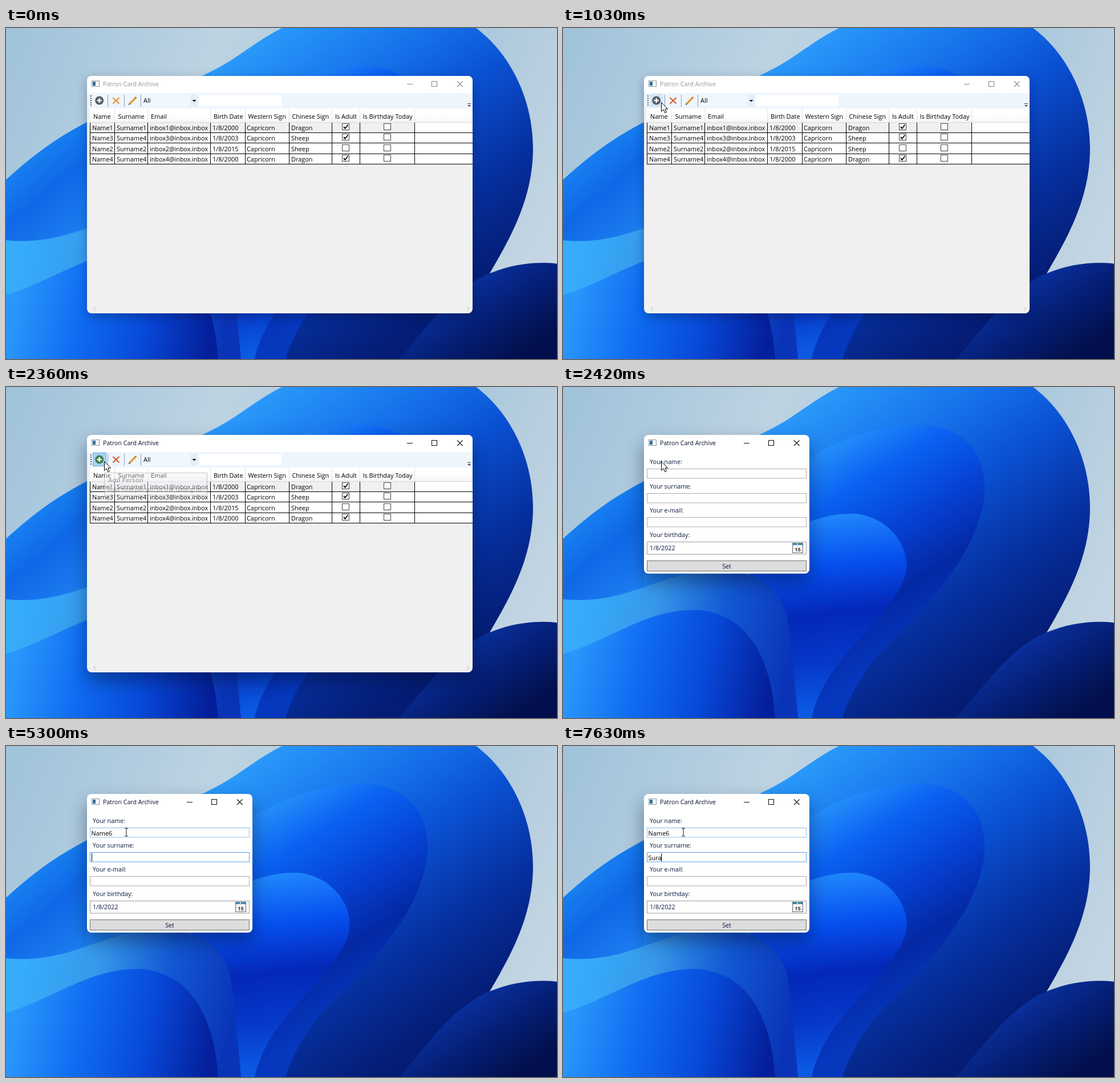
Write an HTML page that moves like this. It is 966 by 580 pixels and loops after 8000 ms.

```html
<!DOCTYPE html>
<html lang="en">
<head>
<meta charset="utf-8">
<title>Patron Card Archive</title>
<style>
html, body { margin: 0; width: 100%; height: 100%; overflow: hidden; }
svg { display: block; width: 966px; height: 580px; }
text { font: 10.9px "Open Sans", "Noto Sans", sans-serif; fill: #000; white-space: pre; }
.title { font-size: 10.6px; font-weight: 500; }
.label { font-size: 10.7px; fill: #06163c; }
.mail { font-size: 10.75px; }
.tip { fill: #575757; }
.bold { font-weight: 700; }
.crisp { shape-rendering: crispEdges; }
.calm { filter: drop-shadow(0 6px 9px rgba(0, 10, 40, .3)); }
.lively { filter: drop-shadow(0 15px 16px rgba(0, 10, 40, .42)); }
</style>
</head>
<body>
<svg id="stage" viewBox="0 0 966 580" xmlns="http://www.w3.org/2000/svg">
  <defs id="defs">
    <clipPath id="gridClip"><rect x="142" y="84" width="676" height="416" rx="8"/></clipPath>
  </defs>
  <g id="wall"></g>

  <g id="listWin">
    <rect id="listFrame" x="142" y="84" width="676" height="416" rx="8" fill="#f0f0f0"/>
    <g clip-path="url(#gridClip)">
      <rect x="142" y="84" width="676" height="30" fill="#fff"/>
      <rect x="142" y="114" width="676" height="27" fill="#eef5fd"/>
      <g id="listTitle"></g>
      <rect id="addBack" x="152.5" y="115.500" width="23" height="23" fill="none"/>
      <rect id="delBack" x="181.500" y="115.500" width="23" height="23" fill="#d3e6f7" stroke="#b5d5f0"/>
      <path d="M149 118V137" stroke="#555" stroke-width="2" stroke-dasharray="2 2"/>
      <path d="M178.500 117V138M207.500 117V138M236.500 117V138" stroke="#8d9bb0"/>
      <circle id="addDot" cx="163.700" cy="127" r="7.500"/>
      <path d="M163.700 123V131M159.700 127H167.700" stroke="#fff" stroke-width="2.400"/>
      <path id="delMark" d="M187.500 122L198.500 132.500M198.500 122L187.500 132.500" stroke-width="2.200"/>
      <path d="M217 132.500L227 122.500" stroke="#e39a30" stroke-width="3.400"/>
      <path d="M214.500 135L216 131.500L218.200 133.700Z" fill="#4b4b4b"/>
      <path d="M226.500 121L228.500 123" stroke="#b9722a" stroke-width="2.400"/>
      <rect x="238" y="117" width="98" height="20" fill="#f1f7fe"/>
      <rect x="323" y="117" width="13" height="20" fill="#e4eefa"/>
      <text x="241" y="131">All</text>
      <path d="M326.500 126H333.500L330 129.500Z" fill="#111"/>
      <rect x="338" y="117" width="145" height="20" fill="#fff"/>
      <path d="M809 132.500H815" stroke="#444"/>
      <path d="M809 135H815L812 138Z" fill="#444"/>
      <g id="grid"></g>
      <path d="M158 488.500L154 492L158 495.500M808 488.500L812 492L808 495.500" fill="none" stroke="#bdbdbd"/>
    </g>
    <g id="tip">
      <rect x="172.500" y="150.500" width="180" height="39" fill="#f1f2f7" stroke="#767676"/>
      <text class="tip bold" x="179" y="167">Add Person</text>
      <text class="tip" x="179" y="182.500">Add new person to the data grid.</text>
    </g>
  </g>

  <g id="formWin">
    <rect class="lively" x="142" y="84" width="290" height="243" rx="8" fill="#fff"/>
    <g id="formTitle"></g>
    <g id="form"></g>
    <path id="caret" class="crisp" stroke="#000" stroke-width="1"/>
  </g>

  <path id="arrow" d="M.5.500V16.300L4.200 12.900L6.700 18.700L9.300 17.600L6.900 12H11.700Z" fill="#fff" stroke="#000"/>
  <path id="beam" d="M-3-7H-1L0-6L1-7H3M0-6V6M-3 7H-1L0 6L1 7H3" fill="none" stroke="#111"/>
</svg>
<script>
const NS = 'http://www.w3.org/2000/svg';
const LOOP = 8000;
const $ = id => document.getElementById(id);

function add(parent, tag, attrs, content) {
  const el = document.createElementNS(NS, tag);
  for (const k in attrs) el.setAttribute(k, attrs[k]);
  if (content) el.textContent = content;
  parent.appendChild(el);
  return el;
}
const label = (parent, x, y, str, cls = '') => add(parent, 'text', { x, y, class: cls }, str);
const rect = (parent, x, y, width, height, fill, stroke = 'none') =>
  add(parent, 'rect', { x, y, width, height, fill, stroke });

// Backdrop: a pale sky and a few broad blue shapes in soft gradients
function gradient(id, x1, y1, x2, y2, colors) {
  const g = add($('defs'), 'linearGradient', { id, x1, y1, x2, y2, gradientUnits: 'userSpaceOnUse' });
  colors.split(' ').forEach((c, i, all) =>
    add(g, 'stop', { offset: i / (all.length - 1), 'stop-color': c }));
}
const shape = (fill, d) => add($('wall'), 'path', { d, fill: `url(#${fill})` });

function buildWall() {
  gradient('sky', 0, 0, 966, 430, '#9fc2da #bdd3e2 #a5c5db #c8d8e4');
  gradient('body', 420, 20, 760, 500, '#2c9cfb #1878ee #0a50d2 #06309f #041c74');
  gradient('arch', 470, 80, 680, 420, '#2a98fb #0a62f2 #0642d4 #0428a4 #0638be');
  gradient('core', 480, 225, 520, 560, '#1f86fb #0650f0 #0428b8 #0638c8 #0c5ae4');
  gradient('side', 20, 220, 130, 350, '#1a86f4 #0f68e6 #1c7cf0');
  gradient('cyan', 30, 390, 400, 470, '#36acfb #3798ea #1258d4 #0a34b8');
  gradient('wave', 20, 470, 360, 540, '#2a96fb #0f6cf2 #0848d8 #041f9a');
  gradient('night', 790, 430, 890, 580, '#0a36ac #052078 #030f4c');

  rect($('wall'), 0, 0, 966, 580, 'url(#sky)');
  shape('body', 'M0 266C48 222 90 192 142 165C230 122 320 105 400 53C430 33 455 14 484 0H824C888 48 924 130 924 210C924 295 888 362 848 430L760 580H0Z');
  shape('arch', 'M380 165C460 92 560 62 640 67C710 74 746 125 738 195C726 285 650 375 575 445C530 490 502 540 490 580H380Z');
  shape('core', 'M330 300C390 248 450 220 512 222C580 229 612 290 600 330C580 395 505 445 465 510C448 540 440 560 436 580H300Z');
  shape('side', 'M0 266C48 222 90 192 142 165V400H0Z');
  shape('cyan', 'M0 372C110 382 155 332 250 323C335 317 388 350 396 420C402 480 408 530 412 580H0Z');
  shape('wave', 'M0 468C90 440 150 387 240 391C325 400 365 475 372 580H0Z');
  shape('night', 'M690 580C740 520 790 452 848 430C890 413 930 409 966 413V580Z');
}

function titleBar(parent, right) {
  add(parent, 'rect', { x: 150.5, y: 92.5, width: 13, height: 10, fill: '#f5f8fa', stroke: '#8b969e' });
  rect(parent, 152, 94, 5, 7, '#2f7199');
  const name = label(parent, 170, 102.3, 'Patron Card Archive', 'title');
  const marks = add(parent, 'path', {
    d: `M${right - 115} 98.500h10M${right - 71.5} 93.500h9v9h-9zM${right - 27} 93.500l9.500 9.500m0-9.500l-9.500 9.500`,
    fill: 'none', 'stroke-width': 1.1
  });
  return active => {
    name.style.fill = active ? '#06102c' : '#929b90';
    marks.setAttribute('stroke', active ? '#111' : '#888');
  };
}

function buildGrid() {
  const g = $('grid');
  const cols = [147, 190, 248, 358, 419, 496, 571, 620, 716];
  const heads = ['Name', 'Surname', 'Email', 'Birth Date', 'Western Sign', 'Chinese Sign', 'Is Adult', 'Is Birthday Today'];
  const headX = [153, 196.5, 254, 364, 424.5, 501.5, 577, 625.5];
  const cellX = [151, 194, 252, 362, 422, 500];
  const rows = [
    [1, 1, '2000', 'Dragon', true], [3, 4, '2003', 'Sheep', true],
    [2, 2, '2015', 'Sheep', false], [4, 4, '2000', 'Dragon', true]
  ];
  gradient('head', 0, 141, 0, 165, '#ffffff #ffffff #f4f5f7');
  rect(g, 147, 141, 671, 24, 'url(#head)');
  rect(g, 147, 165, 671, 74, '#fff');
  rect(g, 147, 165, 569, 18, '#f0f0f0');
  heads.forEach((h, i) => label(g, headX[i], 158.5, h));

  const box = (x, y, on) => {
    rect(g, x + .5, y + .5, 12, 11, '#fff', '#444');
    if (on) add(g, 'path', { d: `M${x + 3} ${y + 6}l2.500 3l5-6.500`, fill: 'none', stroke: '#14182c', 'stroke-width': 2 });
  };
  rows.forEach(([n, s, year, sign, adult], i) => {
    const y = 178.7 + i * 18.4;
    ['Name' + n, 'Surname' + s, `inbox${n}@inbox.inbox`, '1/8/' + year, 'Capricorn', sign]
      .forEach((str, c) => label(g, cellX[c], y, str, c === 2 ? 'mail' : ''));
    const top = Math.round(167 + i * 18.4);
    box(589, top, adult);
    box(662, top, false);
    rect(g, 147, [183, 201, 220, 238][i], 671, 1, '#000');
  });
  cols.forEach((x, i) => {
    if (i) rect(g, x, 142, 1, 23, '#dfe2e6');
    rect(g, x, 165, 1, 74, '#000');
  });
  rect(g, 147, 165, 671, 1, '#d5d8dc');
}

const field = {};
function buildForm() {
  const g = $('form');
  [['name', 'Your name:', 143], ['surname', 'Your surname:', 186], ['mail', 'Your e-mail:', 228]].forEach(([key, str, y]) => {
    label(g, 152, y - 7.7, str, 'label');
    const box = rect(g, 147.5, y + .5, 279, 16.5, '#fff', '#abadb3');
    field[key] = { box, text: label(g, 149.5, y + 13.5, ''), y };
  });
  label(g, 152, 262.6, 'Your birthday:', 'label');
  rect(g, 147.5, 271.5, 279, 21.5, '#fff', '#969ca4');
  label(g, 152, 286, '1/8/2022', 'label');
  rect(g, 402.5, 273.5, 18, 17, '#f4f4f4', '#66696c');
  rect(g, 403, 274, 17, 3, '#3b8cab');
  rect(g, 410, 274, 2, 2, '#fff');
  const day = label(g, 411.5, 287.7, '15', 'bold');
  day.style.fontSize = '9px';
  day.style.fill = '#333';
  day.setAttribute('text-anchor', 'middle');
  rect(g, 147.5, 304.5, 279, 18, '#dddddd', '#707070');
  label(g, 287, 318, 'Set', 'label').setAttribute('text-anchor', 'middle');
}

// Latest value of a [time, value] table
const at = (steps, t) => steps.reduce((v, s) => t >= s[0] ? s[1] : v, steps[0][1]);

const tipShow = [[0, 0], [1430, .5], [1500, 1], [2290, .7], [2360, .4]];
const nameText = [[0, ''], [3620, 'N'], [3760, 'Na'], [3900, 'Nam'], [4100, 'Name'], [4830, 'Name6']];
const surnameText = [[0, ''], [5900, 'S'], [6020, 'Su'], [6170, 'Sur'], [6310, 'Sura'], [6440, 'Suran'],
  [6640, 'Suranm'], [6840, 'Suranme'], [7370, 'Suranm'], [7570, 'Suran'], [7630, 'Sura']];
const caretOn = [[0, 0], [3090, 1], [3550, 0], [3620, 1], [4640, 0], [4830, 1], [5230, 0], [5300, 1], [5830, 0], [5900, 1]];
const nameEdge = [[0, '#abadb3'], [2690, '#8dbdea'], [3030, '#569de5'], [5300, '#8dbdea']];
const surnameEdge = [[0, '#abadb3'], [5230, '#8dbdea'], [5300, '#569de5']];
const pointer = [[0, null], [960, [174, 131]], [1030, [172, 130]], [2620, [186, 139]], [2690, null]];
const beamSpot = [[0, null], [2690, [206, 147]], [2960, [211, 151]], [3620, null], [5230, [211, 151]]];

function glide(t) {
  const p = Math.floor((t - 130) / 69) / 11;
  const k = Math.pow(1 - Math.min(1, p), 1.7);
  return [178 + 670 * k, 134 + 392 * k];
}
function place(el, spot) {
  el.style.display = spot ? '' : 'none';
  if (spot) el.setAttribute('transform', `translate(${spot[0]} ${spot[1]})`);
}
const show = (el, on) => { el.style.display = on ? '' : 'none'; };

function render(t) {
  const form = t >= 2420;
  show($('listWin'), !form);
  show($('formWin'), form);
  const spot = t >= 130 && t < 960 ? glide(t) : at(pointer, t);
  place($('arrow'), spot);
  place($('beam'), at(beamSpot, t));

  if (!form) {
    const pressed = t >= 2290;
    const hover = t >= 960;
    setActive(pressed);
    $('listFrame').setAttribute('class', pressed ? 'lively' : 'calm');
    $('addBack').setAttribute('fill', pressed ? '#a6d3f3' : hover ? '#d3e6f7' : 'none');
    $('addBack').setAttribute('stroke', pressed ? '#6fb2e2' : 'none');
    $('addDot').setAttribute('fill', pressed ? '#3f8250' : '#545e66');
    show($('delBack'), spot && spot[0] > 181 && spot[0] < 206 && spot[1] < 150);
    $('delMark').setAttribute('stroke', t < 750 ? '#e0932c' : '#e0582f');
    $('tip').setAttribute('opacity', at(tipShow, t));
    return;
  }
  const { name, surname } = field;
  name.text.textContent = at(nameText, t);
  surname.text.textContent = at(surnameText, t);
  name.box.setAttribute('stroke', at(nameEdge, t));
  surname.box.setAttribute('stroke', at(surnameEdge, t));
  const focus = t < 5230 ? name : surname;
  const x = Math.round(149.5 + focus.text.getComputedTextLength()) + .5;
  $('caret').setAttribute('d', `M${x} ${focus.y + 2}V${focus.y + 16}`);
  show($('caret'), at(caretOn, t));
}

buildWall();
buildGrid();
buildForm();
const setActive = titleBar($('listTitle'), 818);
titleBar($('formTitle'), 432)(true);

const start = performance.now();
function tick() {
  render((performance.now() - start) % LOOP);
  requestAnimationFrame(tick);
}
tick();
</script>
</body>
</html>
```
